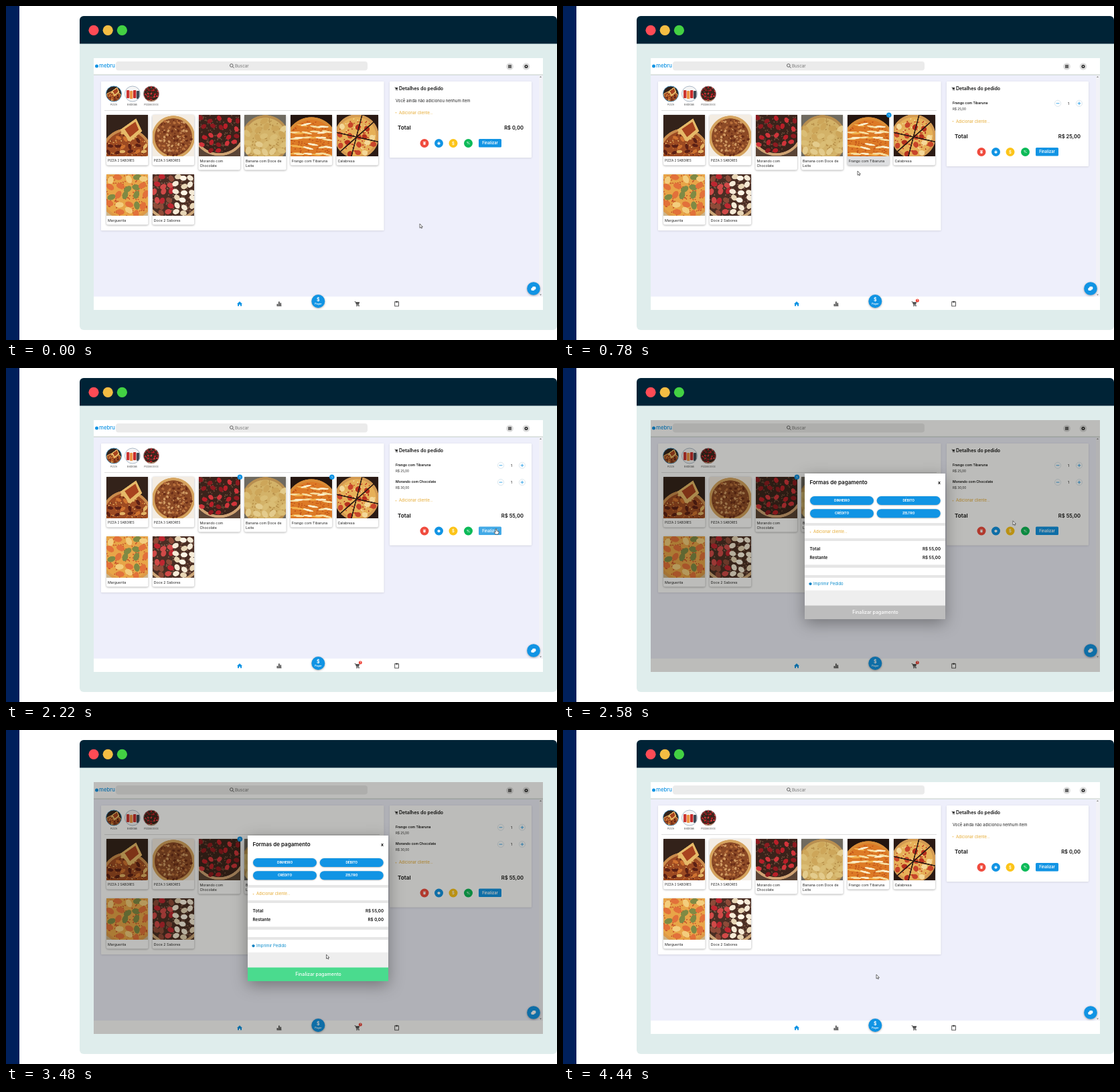
These frames come from a looping animation (823x500 px, 4470 ms). An HTML page with a canvas:

```html
<!DOCTYPE html>
<html lang="pt">
<head>
<meta charset="utf-8">
<style>
  html, body { margin: 0; overflow: hidden; background: #fff; }
  canvas { display: block; }
</style>
</head>
<body>
<canvas id="stage" width="823" height="500"></canvas>
<script>
let c = document.getElementById('stage').getContext('2d');
const LOOP = 4470, BLUE = '#1194e4', INK = '#111', ICON = '#444', GOLD = '#e5a92f';
const GREEN = '#4adb8e';
// Moments (ms) at which the interface changes state
const ADD1 = 640, ADD2 = 1260, OPEN = 2400, PAID = 3120, DONE = 3780, CLOSE = 4260;

const clamp = v => Math.max(0, Math.min(1, v));
const ease = u => u * u * (3 - 2 * u);

const path = [
  [0, 618, 326], [400, 455, 214], [600, 452, 208], [780, 440, 247],
  [1080, 320, 212], [1260, 320, 212], [1650, 438, 366], [2150, 732, 241],
  [2400, 732, 241], [2900, 531, 200], [3160, 531, 200], [3600, 467, 366],
  [4260, 467, 366], [4440, 468, 366], [LOOP, 468, 366]
];
function cursorAt(t) {
  const i = Math.max(1, path.findIndex(p => p[0] > t));
  const [t0, x0, y0] = path[i - 1], [t1, x1, y1] = path[i];
  const u = ease(clamp((t - t0) / (t1 - t0)));
  return [x0 + (x1 - x0) * u, y0 + (y1 - y0) * u];
}
const inside = ([px, py], x, y, w, h) => px >= x && px <= x + w && py >= y && py <= y + h;

// Drawing helpers
function box(x, y, w, h, fill, r = 0, shadow = 0, strength = .35) {
  c.save();
  if (shadow) {
    c.shadowColor = `rgba(0,0,0,${strength})`;
    c.shadowBlur = shadow;
    c.shadowOffsetY = shadow / 4;
  }
  c.fillStyle = fill;
  c.beginPath();
  c.roundRect(x, y, w, h, r);
  c.fill();
  c.restore();
}
function disc(x, y, r, fill, shadow = 0) { box(x - r, y - r, 2 * r, 2 * r, fill, r, shadow); }
function ring(x, y, r, color, width = 1) {
  c.strokeStyle = color;
  c.lineWidth = width;
  c.beginPath();
  c.arc(x, y, r, 0, 7);
  c.stroke();
}
function line(color, width, ...pts) {
  c.strokeStyle = color;
  c.lineWidth = width;
  c.beginPath();
  pts.forEach(([x, y]) => c.lineTo(x, y));
  c.stroke();
}
function poly(fill, ...pts) {
  c.fillStyle = fill;
  c.beginPath();
  pts.forEach(([x, y]) => c.lineTo(x, y));
  c.fill();
}
function text(s, x, y, size, color = INK, weight = 400, align = 'left') {
  c.font = `${weight} ${size}px Inter, sans-serif`;
  c.fillStyle = color;
  c.textAlign = align;
  c.textBaseline = 'middle';
  c.fillText(s, x, y);
}
function at(x, y, scale, draw) {
  c.save();
  c.translate(x, y);
  c.scale(scale, scale);
  draw();
  c.restore();
}

// Food pictures on a 62 x 62 square: a round base, fine grain, then toppings
// of radii w, h in a jittered grid of n x n; cuts are gaps between slices
const foods = [
  { bg: '#33221a', crust: '#c98b4c', base: '#9c4a22', at: [30, 58, 38], n: 6, w: 4.4, h: 2.4,
    tops: ['#e3b365', '#5c2015', '#cf7230'], slice: true },
  { bg: '#f3ece2', crust: '#d5a35e', base: '#8c4a26', at: [31, 33, 32], n: 9, w: 2.2, h: 1.6,
    tops: ['#d09a62', '#6a2d18', '#b9703c'] },
  { bg: '#5a4436', crust: '#cfa273', base: '#3a231b', at: [31, 20, 41], n: 5, w: 4.2, h: 3.2,
    tops: ['#b81f28', '#d0343a', '#8e1a20'], grain: '#6d4a38' },
  { bg: '#6f6a60', crust: '#b98f50', base: '#d3b268', at: [31, 36, 36], n: 5, w: 6, h: 4,
    tops: ['#e3cb8c', '#dabd75', '#cda65a'], grain: '#b58d48' },
  { bg: '#24150f', crust: '#d98b35', base: '#dd7a26', at: [31, 42, 39], n: 6, w: 8, h: 1.5, tilt: .5,
    tops: ['#fbeecb', '#f7dda0', '#f2b04c'], grain: '#c2551a' },
  { bg: '#2b1a14', crust: '#d39a52', base: '#e6b058', at: [30, 32, 33], n: 5, w: 4.4, h: 3.8,
    tops: ['#b5301e', '#f4d898', '#c8452a'], cuts: true },
  { bg: '#cdb58c', crust: '#dd9a49', base: '#e8a548', at: [31, 24, 44], n: 5, w: 6.2, h: 4.2,
    tops: ['#e2713a', '#7f8a44', '#f3cd7d'], grain: '#c9542c' },
  { bg: '#5a4032', crust: '#cda779', base: '#4a2e24', at: [31, 22, 47], n: 6, w: 5, h: 3.8,
    tops: ['#bd2730', '#d04a48', '#8e4a38'], cream: ['#f5ead6', '#e8d6b6', '#fff6e6'], grain: '#8a6350' }
];
function paintFood(f) {
  let seed = 7;
  const rnd = () => (seed = seed * 16807 % 2147483647) / 2147483647;
  const [cx, cy, r] = f.at;
  box(0, 0, 62, 62, f.bg);
  disc(cx, cy, r, f.crust);
  disc(cx, cy, r - 4, f.base);
  const blob = (x, y, w, h, fill) => {
    if (Math.hypot(x - cx, y - cy) > r - 5) return;
    c.fillStyle = fill;
    c.beginPath();
    c.ellipse(x, y, w, h, (rnd() - .5) * (f.tilt || 3), 0, 7);
    c.fill();
  };
  for (let i = 0; i < 160; i++) blob(rnd() * 62, rnd() * 62, 1.2, .8, f.grain || f.tops[i % 3]);
  for (let i = 0; i < f.n * f.n; i++) {
    const x = (i % f.n + .2 + rnd() * .6) * 62 / f.n;
    const y = (Math.floor(i / f.n) + .2 + rnd() * .6) * 62 / f.n;
    const tops = f.cream && x > 31 ? f.cream : f.tops;
    blob(x, y, f.w, f.h, tops[Math.floor(rnd() * 3)]);
  }
  if (f.cuts) [[0, 26, 62, 40], [38, 0, 22, 62], [4, 56, 58, 8]]
    .forEach(([x0, y0, x1, y1]) => line(f.bg, 1.6, [x0, y0], [x1, y1]));
  if (f.slice) {
    poly('#e6b968', [20, 22], [44, 5], [53, 24], [35, 40]);
    poly('#a8431f', [27, 21], [43, 10], [48, 22], [35, 33]);
  }
}
const main = c;
const photos = foods.map(f => {
  const tile = document.createElement('canvas');
  tile.width = tile.height = 124;
  c = tile.getContext('2d');
  at(0, 0, 2, () => paintFood(f));
  return tile;
});
c = main;

function roundPhoto(x, border, draw) {
  c.save();
  c.beginPath();
  c.arc(x, 131.5, 11.5, 0, 7);
  c.clip();
  draw();
  c.restore();
  ring(x, 131.5, 11.5, border, .8);
}

const cards = [
  ['PIZZA 2 SABORES'], ['PIZZA 3 SABORES'], ['Morando com', 'Chocolate'],
  ['Banana com Doce de', 'Leite'], ['Frango com Tibaruna'], ['Calabresa'],
  ['Marguerita'], ['Doce 2 Sabores']
].map((label, i) => ({
  label, x: 150 + i % 6 * 68.7, y: i < 6 ? 163 : 252, h: label[1] ? 82.5 : 75.5
}));
const overCard = (p, k) => inside(p, k.x, k.y, 62.5, k.h);

function cartIcon(x, y, s, color) {
  at(x, y, s, () => {
    line(color, 1, [-4, -3.5], [-2.6, -3.5], [-.8, 1.5], [3, 1.5]);
    poly(color, [-2.2, -3], [4, -3], [2.7, .5], [-1, .5]);
    disc(-.4, 3, .9, color);
    disc(2.6, 3, .9, color);
  });
}
function printIcon(x, y, color) {
  box(x - 2, y - .9, 4, 2.2, color, .4);
  box(x - 1.2, y - 2, 2.4, .8, color);
  box(x - 1.2, y + .9, 2.4, 1.2, color);
}
function badge(x, y, r, color) {
  disc(x, y, r, color);
  text('1', x, y + .2, 4, '#fff', 500, 'center');
}

function frame() {
  box(0, 0, 823, 500, '#fff');
  box(0, 0, 20, 500, '#00205b');
  box(110, 15, 713, 470, '#dfedec', 6);
  box(110, 15, 713, 41.6, '#002336', [6, 6, 0, 0]);
  ['#ff4b55', '#f3bd43', '#43d143'].forEach((col, i) => disc(131 + i * 21.2, 36.3, 7.6, col));
}

function topBar() {
  box(131, 78, 671, 377, '#eeeffb');
  box(796, 103, 6, 332, '#f2f2f7');
  box(131, 78, 671, 25, '#fff');
  box(131, 102.6, 671, 1, '#c3cdc6');
  disc(135.5, 90, 2.5, BLUE);
  text('mebru', 139, 90, 7.8, BLUE, 500);
  box(164, 83, 376, 13.5, '#ebebeb', 4);
  ring(336.8, 89, 2.3, '#555', .9);
  line('#555', 1, [338.5, 90.7], [340.5, 92.8]);
  text('Buscar', 342, 90, 6.3, '#777');
  disc(752.5, 90.5, 5.3, '#dcdcdc');
  box(750, 88, 5, 5, '#666', .5);
  disc(777, 90.5, 5.3, '#dcdcdc');
  disc(777, 90.5, 2.5, '#222');
  disc(777, 90.5, .9, '#fff');
  poly('#888', [797, 107], [800, 107], [798.5, 105]);
  poly('#888', [797, 431.5], [800, 431.5], [798.5, 433.5]);
}

function menu(p, items) {
  box(142, 113, 422.5, 223, '#fff', 1, 3, .13);
  roundPhoto(161, '#3795cc', () => c.drawImage(photos[0], 149, 119.5, 24, 24));
  roundPhoto(189, '#9ab', () => {
    box(177, 119, 24, 25, '#f5f5f5');
    ['#cb3430', '#ef9445', '#c82d2d', '#3d4a55'].forEach((col, i) => box(180 + i * 5, 126 + i % 2, 4.4, 12, col, 1));
  });
  roundPhoto(217, '#a88', () => c.drawImage(photos[2], 205, 119.5, 24, 24));
  text('PIZZA', 161, 148, 3.6, '#555', 400, 'center');
  text('Bebidas', 188.5, 148, 3.9, '#555', 400, 'center');
  text('Pizzas Doce', 217, 148, 3.7, '#555', 400, 'center');
  box(147, 156, 411, .8, '#d2d2d2');
  cards.forEach((k, i) => {
    box(k.x, k.y, 62.5, k.h, overCard(p, k) ? '#dedfe1' : '#fff', 2.5, 3);
    c.drawImage(photos[i], k.x + .3, k.y + .3, 62, 62);
    const size = i < 2 ? 4.6 : 5.3;
    k.label.forEach((s, n) => text(s, k.x + 2, k.y + 69 + n * 7, size, '#222'));
    if (items > 0 && i === 4 || items > 1 && i === 2) badge(k.x + 62, 163.2, 3.8, BLUE);
  });
}

function orderRow(y, name, price) {
  text(name, 582, y, 5.1, INK, 600);
  text(price, 582, y + 9.3, 4.7, '#222');
  [739, 771].forEach(x => {
    ring(x, y + .8, 4.6, '#cfdde5', .7);
    line(BLUE, .8, [x - 2.4, y + .8], [x + 2.4, y + .8]);
  });
  line(BLUE, .8, [771, y - 1.6], [771, y + 3.2]);
  text('1', 755, y + 1, 5, INK, 400, 'center');
}

const shifts = [0, 13, 38.5];
function order(p, items) {
  const d = shifts[items];
  box(573, 113, 212, 114 + d, '#fff', 1, 3, .13);
  cartIcon(583, 124, .6, INK);
  text('Detalhes do pedido', 587, 124, 7.1, INK, 600);
  if (!items) text('Você ainda não adicionou nenhum item', 582, 142.3, 6, '#222');
  if (items > 0) orderRow(145, 'Frango com Tibaruna', 'R$ 25,00');
  if (items > 1) orderRow(170.3, 'Morando com Chocolate', 'R$ 30,00');
  text('+', 581, 160 + d, 4.5, GOLD);
  text('Adicionar cliente...', 587, 160 + d, 5.8, GOLD);
  text('Total', 585, 183 + d, 8.2, INK, 600);
  text(['R$ 0,00', 'R$ 25,00', 'R$ 55,00'][items], 773, 183 + d, 7.6, INK, 600, 'right');
  const y = 205.5 + d;
  [[625, '#f04b3e'], [646.5, BLUE], [668, '#fcc419'], [690.5, '#0cba58']]
    .forEach(([x, col]) => disc(x, y, 6.5, col));
  box(623.4, y - 1.2, 3.2, 3.4, '#fff', .6);
  box(622.9, y - 2.3, 4.2, .8, '#fff');
  printIcon(646.5, y, '#fff');
  text('$', 668, y + .3, 6, '#fff', 600, 'center');
  text('%', 690.5, y + .3, 5, '#fff', 600, 'center');
  const over = inside(p, 706, y - 6.5, 34, 13);
  box(706, y - 6.5, 34, 12.6, over ? '#42a9e6' : BLUE, 1.5);
  text('Finalizar', 723, y, 5.8, '#fff', 600, 'center');
}

function bottomBar(items) {
  box(131, 435, 671, 20, '#fff');
  poly(BLUE, [345, 446], [349, 442.3], [353, 446], [352, 446], [352, 449.3],
    [350, 449.3], [350, 447], [348, 447], [348, 449.3], [346, 449.3], [346, 446]);
  [[404.6, 3], [407, 6.5], [409.4, 4.5]].forEach(([x, h]) => box(x, 449 - h, 1.7, h, ICON));
  box(404.5, 448.6, 7, .8, ICON);
  disc(466.3, 442, 10, BLUE, 3);
  text('$', 466.3, 440, 7, '#fff', 700, 'center');
  text('Pagar', 466.3, 446, 3.6, '#fff', 600, 'center');
  cartIcon(524.5, 446, .95, ICON);
  if (items) badge(529.3, 441, 2.5, '#ee4136');
  c.strokeStyle = ICON;
  c.lineWidth = .9;
  c.strokeRect(580.7, 442.8, 5.8, 6.4);
  box(582, 441.8, 3.2, 2, ICON);
  disc(788, 423, 9.8, BLUE, 3);
  box(786, 420, 5.4, 4.4, '#fff', 1.5);
  box(784.4, 421.8, 5, 4.2, '#fff', 1.5);
}

function payment(p, t) {
  text('Formas de pagamento', 368.5, 171.5, 8, INK, 600);
  text('x', 562, 171.5, 7, INK, 700, 'center');
  ['DINHEIRO', 'DÉBITO', 'CRÉDITO', 'ZELTRO'].forEach((s, i) => {
    const x = 369 + i % 2 * 99.7, y = i < 2 ? 192 : 211.2;
    const over = inside(p, x, y, 95, 13);
    box(x, y, 95, 13, over ? '#32a4ea' : BLUE, 6.5, over ? 4 : 2);
    text(s, x + 47.5, y + 6.7, 4.8, '#fff', 700, 'center');
  });
  [[232, 4], [255, 4], [294.5, 4.5], [310, 4]].forEach(([y, h]) => box(361, y, 210, h, '#e6e6e6'));
  text('+', 368, 245.3, 4.5, GOLD);
  text('Adicionar cliente...', 374, 245.3, 5.8, GOLD);
  text('Total', 368.5, 271, 6.6, INK, 600);
  text('R$ 55,00', 564, 271, 6.2, INK, 600, 'right');
  text('Restante', 368.5, 284, 6.3, INK, 600);
  text(t < PAID ? 'R$ 55,00' : 'R$ 0,00', 564, 284, 6.2, INK, 600, 'right');
  printIcon(369.5, 323, '#0b7fc0');
  text('Imprimir Pedido', 374, 323.5, 6, '#0b8ccc');
  box(361, 333, 210, 22.5, '#eeeeee');
  box(361, 355.5, 210, 20.5, t < PAID ? '#bdbdbd' : GREEN);
  text('Finalizar pagamento', 466.5, 366, 7.1, '#fff', 500, 'center');
}

function success(t) {
  at(468, 254, .6 + .4 * ease(clamp((t - DONE) / 150)), () => {
    c.fillStyle = '#05bd58';
    c.beginPath();
    for (let i = 0; i < 24; i++) {
      const r = i % 2 ? 18 : 21.3, a = i * Math.PI / 12;
      c.lineTo(r * Math.sin(a), -r * Math.cos(a));
    }
    c.fill();
    line('#fff', 3.2, [-7.5, .5], [-2.5, 5.5], [8, -5]);
  });
  box(361, 355.5, 210, 20.5, GREEN);
  for (let i = 0; i < 2; i++) disc(463 + i * 4, 364, .8, '#d5f8e5');
}

function pointer([x, y], hand) {
  at(x, y, 1, () => {
    c.beginPath();
    const pts = hand
      ? [[-.8, 0], [.8, 0], [.9, 2.8], [4, 3.6], [4, 6], [3, 8], [-.8, 8], [-3, 5], [-2.2, 4.2], [-.8, 5]]
      : [[0, 0], [0, 6.3], [1.5, 5], [2.5, 7], [3.5, 6.5], [2.5, 4.7], [4.4, 4.6]];
    pts.forEach(q => c.lineTo(...q));
    c.closePath();
    c.fillStyle = '#fff';
    c.fill();
    c.strokeStyle = '#333';
    c.lineWidth = .7;
    c.stroke();
  });
}

function draw(t) {
  const p = cursorAt(t);
  const items = t < ADD1 ? 0 : t < ADD2 ? 1 : t < DONE ? 2 : 0;
  const modal = ease(clamp((t - OPEN) / 160)) * (1 - ease(clamp((t - CLOSE) / 130)));
  // Hover colours trail the pointer slightly
  const hoverPoint = modal ? [0, 0] : cursorAt(Math.max(0, t - 70));
  frame();
  topBar();
  menu(hoverPoint, items);
  order(hoverPoint, items);
  bottomBar(items);
  if (modal) {
    c.globalAlpha = modal;
    box(131, 78, 671, 377, 'rgba(10,10,0,.27)');
    box(361, 158, 210, 218, '#fff', 0, 22);
    if (t < DONE) payment(p, t);
    else success(t);
    c.globalAlpha = 1;
  }
  const hand = modal
    ? inside(p, 369, 192, 195, 33) || inside(p, 361, 355, 210, 21)
    : cards.some(k => overCard(p, k)) || inside(p, 706, 199 + shifts[items], 34, 13);
  pointer(p, hand);
}

const start = performance.now();
function tick() {
  draw((performance.now() - start) % LOOP);
  requestAnimationFrame(tick);
}
tick();
</script>
</body>
</html>
```
